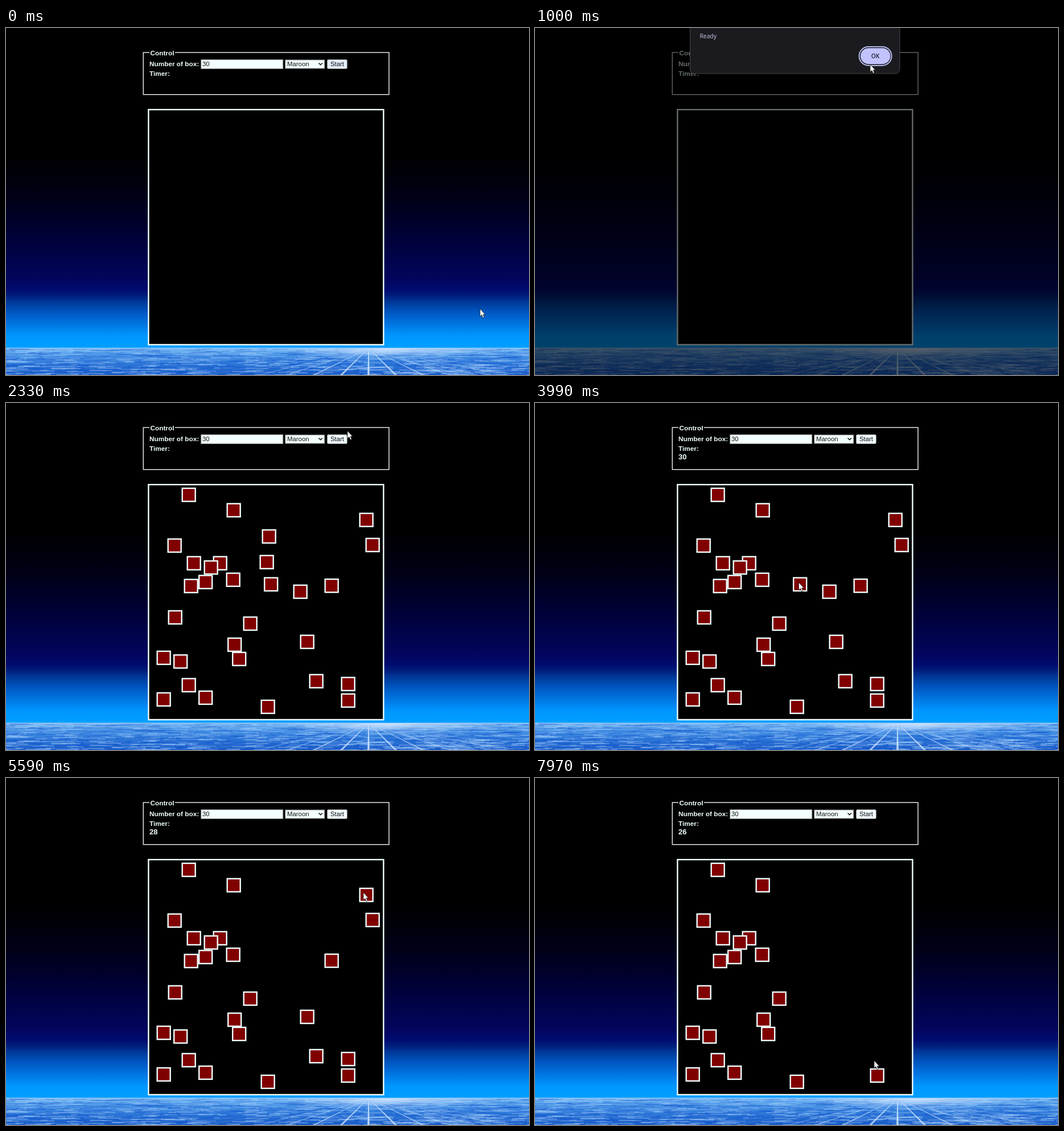
Write an HTML page with a canvas that moves like this. It is 919x609 px and loops after 8 s.

```html
<!DOCTYPE html>
<html lang="en">
<head>
<meta charset="utf-8">
<title>Box game</title>
<style>
html, body { margin: 0; width: 100%; height: 100%; overflow: hidden; background: #000; }
canvas, svg { position: absolute; left: 0; top: 0; width: 919px; height: 609px; display: block; }
text { font-family: "Liberation Sans", Arial, sans-serif; white-space: pre; }
.label { font-size: 11.8px; font-weight: 700; fill: #f0ffff; }
.field { font-size: 11.4px; fill: #111; }
.dialog { font-family: "Open Sans", "Noto Sans", sans-serif; font-size: 10.3px; }
.line { fill: none; stroke: #f0ffff; }
#boxes rect { fill: #800000; stroke: #f0ffff; stroke-width: 2.4; }
</style>
</head>
<body>
<canvas id="sky" width="919" height="609"></canvas>
<svg viewBox="0 0 919 609">
  <path class="line" stroke-width="1.5" style="stroke:#e4e8e8" d="M252 43H241.3V116.7H673V43H297"/>
  <text class="label" x="253.5" y="47.5">Control</text>
  <text class="label" x="252" y="67">Number of box:</text>
  <text class="label" x="252" y="84.3">Timer:</text>
  <text class="label" id="count" x="252" y="99.3" style="font-size:13px"></text>

  <rect x="342.8" y="55.6" width="144" height="16" fill="#f3ffff" stroke="#858585"/>
  <text class="field" x="345" y="67.3">30</text>
  <rect x="490.8" y="56" width="69" height="15" fill="#f3ffff" stroke="#858585"/>
  <text class="field" x="494" y="67.3">Maroon</text>
  <path d="M549.5 61.5l3.2 3.2 3.2-3.2" fill="none" stroke="#111" stroke-width="1.6"/>
  <rect id="start" x="564.4" y="55.5" width="35" height="16" rx="2" stroke="#858585"/>
  <text class="field" x="582" y="67.3" text-anchor="middle">Start</text>

  <rect class="line" x="250.4" y="143.2" width="413" height="412.6" stroke-width="2.4" style="fill:#000"/>
  <g id="boxes"></g>

  <rect id="dim" width="919" height="609"/>
  <g id="dialog">
    <path d="M272.5 -2V72a8 8 0 0 0 8 8H633a8 8 0 0 0 8-8V-2Z" fill="#1b1b1f" stroke="#45464c"/>
    <text class="dialog" x="289.5" y="18" fill="#c9cbec">Ready</text>
    <rect x="569.6" y="32.8" width="57" height="33" rx="16.5" fill="#14141c" stroke="#c9cbff" stroke-width="1.8"/>
    <rect id="ok" x="572" y="35.2" width="52.4" height="28.2" rx="14.1"/>
    <text class="dialog" x="598" y="53" text-anchor="middle" fill="#1e1e3c" font-weight="600">OK</text>
  </g>
  <path id="cursor" d="M0 0V13.2L3 10.5L5.1 15.6L7.3 14.6L5.2 9.8H9Z" fill="#fff" stroke="#222" stroke-width=".8" stroke-linejoin="round"/>
</svg>
<script>
const LOOP = 8000;
const $ = id => document.getElementById(id);

// Stretches in which the picture moves: start, end, number of steps
const BURSTS = [
  [70, 120, 2], [270, 660, 6], [870, 1000, 2], [1480, 1590, 3],
  [2200, 2330, 3], [2590, 2910, 6], [3310, 4060, 12], [4120, 4870, 12],
  [4930, 5720, 13], [5780, 6500, 11], [6590, 7030, 8], [7170, 7970, 12]
];

// Pointer: time, x, y
const PATH = [
  [0, 833, 493], [20, 833, 493], [70, 712, 265], [120, 602, 58], [192, 602, 58],
  [504, 589, 64], [1400, 589, 64], [1480, 592, 60], [1590, 600, 49],
  [2526, 600, 49], [2590, 588, 66], [2846, 457, 226], [2910, 455, 231],
  [3378, 455, 231], [3515, 457, 276], [3720, 457, 276], [3860, 463, 314],
  [3990, 464, 316], [4190, 465, 316], [4400, 516, 328], [4600, 516, 328],
  [4870, 570, 322], [5060, 571, 318], [5400, 625, 203], [5590, 628, 201],
  [5655, 630, 203], [5720, 641, 218], [5850, 644, 249], [6060, 644, 249],
  [6300, 581, 321], [6500, 575, 326], [6653, 575, 327], [6900, 528, 417],
  [7110, 528, 418], [7320, 545, 487], [7530, 545, 487], [7750, 596, 496], [8000, 596, 496]
];

// Boxes: centre x, centre y, time of the hit
const BOXES = [
  [321, 161], [400, 188], [633, 205, 5650], [462, 234, 3310], [644, 249, 5990],
  [296, 250], [330, 281], [376, 281], [360, 288.5], [458, 279, 3650],
  [350.5, 314], [325, 321], [399, 310], [465.5, 318, 4115], [517, 331, 4525],
  [572, 320.5, 6590], [297, 376], [429, 387], [529, 419, 7025], [401.5, 424],
  [409.5, 449], [277, 447], [306.5, 453.5], [545, 488, 7455], [601, 493, 7890],
  [321, 495], [277, 520], [350.5, 517], [460, 533], [601, 522]
];

function drawSky() {
  const c = $("sky").getContext("2d");
  const fade = (y0, y1, stops) => {
    const g = c.createLinearGradient(0, y0, 0, y1);
    for (const [y, color] of stops) g.addColorStop((y - y0) / (y1 - y0), color);
    c.fillStyle = g;
    c.fillRect(0, y0, 919, y1 - y0);
  };
  fade(0, 562, [
    [0, "#000"], [220, "#000"], [260, "#00000a"], [300, "#000018"], [340, "#00002a"],
    [380, "#00023e"], [440, "#02055c"], [460, "#000c70"], [470, "#001e7d"],
    [480, "#003796"], [500, "#0058c3"], [520, "#0076e1"], [540, "#0096ff"], [562, "#00a0ff"]
  ]);
  fade(561, 609, [
    [561, "#8cc4f8"], [566, "#6cb0f0"], [575, "#4a94e6"], [590, "#2f78d8"], [609, "#1b5cc6"]
  ]);

  let seed = 7;
  const rnd = () => (seed = seed * 16807 % 2147483647) / 2147483647;
  for (let i = 0; i < 1100; i++) {
    const d = rnd();
    c.fillStyle = rnd() < .5 ? "rgba(165,208,250,.42)" : "rgba(20,88,205,.42)";
    c.fillRect(rnd() * 960 - 40, 563 + d * 46, 10 + rnd() * 34, 1 + d);
  }

  c.save();
  c.beginPath();
  c.rect(0, 562, 919, 47);
  c.clip();
  c.translate(670, 564);
  c.scale(1, .07);
  const glow = c.createRadialGradient(0, 0, 0, 0, 0, 210);
  glow.addColorStop(0, "rgba(215,232,255,.85)");
  glow.addColorStop(1, "rgba(190,220,255,0)");
  c.fillStyle = glow;
  c.fillRect(-250, -250, 500, 500);
  c.restore();

  for (let k = -7; k <= 7; k++) {
    const x = 637 + k * 48, w = k ? 2.2 : 1.8;
    c.fillStyle = `rgba(205,228,255,${.9 - Math.abs(k) * .11})`;
    c.beginPath();
    c.moveTo(636.5 + k * 2, 564);
    c.lineTo(637.5 + k * 2, 564);
    c.lineTo(x + w, 609);
    c.lineTo(x - w, 609);
    c.fill();
  }
}

function snap(t) {
  let last = 0;
  for (const [a, b, n] of BURSTS) {
    if (t < a) break;
    const step = (b - a) / (n - 1);
    last = t >= b ? b : a + Math.floor((t - a) / step) * step;
  }
  return last;
}

function pointAt(t) {
  let i = 1;
  while (PATH[i][0] < t) i++;
  const [a, x0, y0] = PATH[i - 1], [b, x1, y1] = PATH[i];
  const p = (t - a) / (b - a);
  return [x0 + (x1 - x0) * p, y0 + (y1 - y0) * p];
}

function dialogLevel(t) {
  if (t < 870) return 0;
  if (t < 1000) return .5;
  if (t < 2200) return 1;
  if (t < 2260) return .55;
  return t < 2330 ? .12 : 0;
}

const tiles = BOXES.map(([x, y]) => {
  const r = document.createElementNS("http://www.w3.org/2000/svg", "rect");
  const set = { x: x - 11.3, y: y - 11.3, width: 23, height: 23 };
  for (const k in set) r.setAttribute(k, set[k]);
  return $("boxes").appendChild(r);
});

function draw(time) {
  const t = snap(time);
  const [x, y] = pointAt(t);
  $("cursor").setAttribute("transform", `translate(${x} ${y})`);

  const level = dialogLevel(t);
  $("dim").setAttribute("opacity", level * .58);
  $("dialog").setAttribute("opacity", level);
  $("ok").setAttribute("fill", t >= 1530 ? "#b4b6f0" : "#c1c3ff");
  $("start").setAttribute("fill", t >= 2260 ? "#f0fbff" : t >= 270 ? "#d4e2ec" : "#e3eefa");

  tiles.forEach((tile, i) => {
    const gone = BOXES[i][2] || LOOP;
    tile.style.display = t >= 2260 && t < gone ? "" : "none";
  });
  $("count").textContent = t < 3350 ? "" : 30 - Math.floor((t - 3350) / 1000);
}

drawSky();
const begin = performance.now();
(function tick() {
  draw((performance.now() - begin) % LOOP);
  requestAnimationFrame(tick);
})();
</script>
</body>
</html>
```
